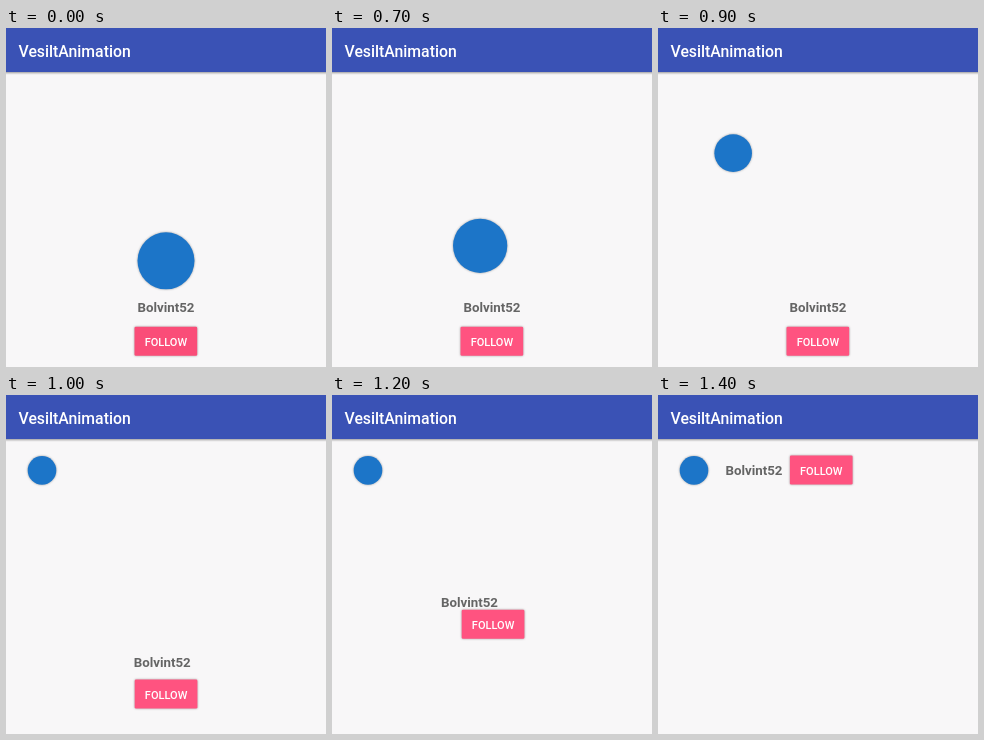
Recreate the animation shown at these times as an HTML page. Size 320 by 339 pixels, loop 1.5 s.

```html
<!DOCTYPE html>
<html lang="en">
<head>
<meta charset="utf-8">
<title>Profile header animation</title>
<style>
  html, body { margin: 0; width: 100%; height: 100%; overflow: hidden; background: #f8f7f8; }
  svg { display: block; width: 320px; height: 339px; font-family: Roboto, sans-serif; }
  .bar { filter: drop-shadow(0 1px 1.2px rgba(0, 0, 0, .4)); }
  .raised { filter: drop-shadow(0 .8px .8px rgba(0, 0, 0, .35)); }
</style>
</head>
<body>
<svg viewBox="0 0 320 339">
  <rect width="320" height="339" fill="#f8f7f8"/>
  <rect class="bar" x="-5" y="-5" width="330" height="49" fill="#3a52b5"/>
  <text x="12.5" y="28.5" font-size="15.8" font-weight="500" fill="#fff">VesiltAnimation</text>
  <circle id="avatar" class="raised" fill="#1c75c8"/>
  <text id="name" x="160" y="284" font-size="13.3" font-weight="700" fill="#656565" text-anchor="middle">Bolvint52</text>
  <g id="button">
    <rect id="face" class="raised" x="128.5" y="298.8" width="62.7" height="29" rx="1.3"/>
    <text x="159.9" y="318" font-size="11" font-weight="500" fill="#fff" text-anchor="middle">FOLLOW</text>
  </g>
</svg>
<script>
  const LOOP = 1500, STEP = 100;
  const [avatar, nameLabel, button, face] =
    ['avatar', 'name', 'button', 'face'].map(id => document.getElementById(id));

  // Phase of each move at successive steps; 0 before and 1 after.
  const avatarMove = { start: 7, phases: [.2, .41, .62] };
  const labelMove = { start: 10, phases: [.157, .28, .405, .67] };

  const ease = t => (1 - Math.cos(Math.PI * t)) / 2;
  const progress = ({ start, phases }, step) =>
    step < start ? 0 : ease(phases[step - start] ?? 1);
  const lerp = (a, b, p) => a + (b - a) * p;
  const shift = (el, x, y) => el.setAttribute('transform', `translate(${x} ${y})`);

  function render(now) {
    const step = Math.floor(now % LOOP / STEP);
    const a = progress(avatarMove, step);
    const b = progress(labelMove, step);

    avatar.setAttribute('cx', lerp(160, 36, a));
    avatar.setAttribute('cy', lerp(232.8, 75.4, a));
    avatar.setAttribute('r', lerp(28.5, 14.3, a));
    shift(nameLabel, -64 * b, -204 * b);
    shift(button, 3.4 * b, -238.3 * b);
    face.setAttribute('fill', step < 2 ? '#fa4d78' : '#ff5380');
  }

  const origin = performance.now();
  (function tick() {
    render(performance.now() - origin);
    requestAnimationFrame(tick);
  })();
</script>
</body>
</html>
```
